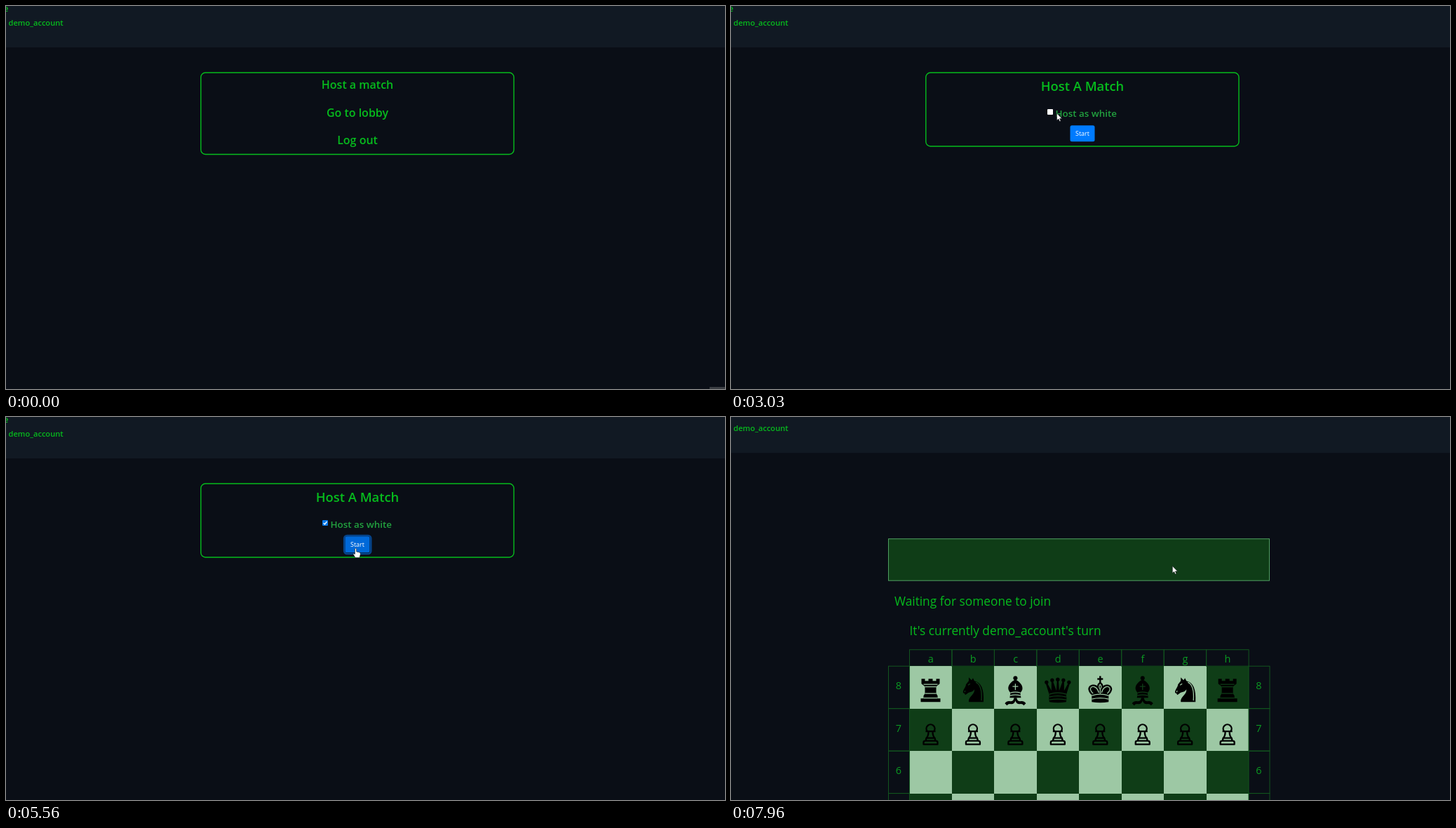
Recreate the animation shown at these times as an HTML page. Size 1025 by 546 pixels, loop 8000 ms.

```html
<!DOCTYPE html>
<html lang="en">
<head>
<meta charset="utf-8">
<title>Host a match</title>
<style>
html, body { margin: 0; width: 100%; height: 100%; overflow: hidden; background: #0a0e16; }
svg { display: block; font-family: "Open Sans", "Noto Sans", sans-serif; fill: #06bc1d; }
.bold { font-weight: 600; }
.mid { text-anchor: middle; }
.frame { fill: none; stroke: #06bc1d; stroke-width: 1.4; }
.grid { fill: none; stroke: #12551f; }
.label { fill: #0b9a22; font-size: 14.5px; text-anchor: middle; }
.piece { fill: #000; }
.cut { fill: none; stroke: var(--cell); stroke-width: 1.3; }
.line { fill: none; stroke: #000; stroke-width: 2.3; stroke-linejoin: round; }
</style>
</head>
<body>
<svg id="stage" width="1025" height="546" viewBox="0 0 1025 546"></svg>
<script>
const USER = "demo_account";
const LOOP = 8000, STEP = 68;
const LIGHT = "#9dc8a4", DARK = "#0f3d17";

// Pieces are drawn in a 60 px cell, centred on x = 30.
const fill = d => `<path d="${d}"/>`;
const cut = d => `<path class="cut" d="${d}"/>`;
const line = d => `<path class="line" d="${d}"/>`;
const dots = list => list.map(([x, y, r]) => `<circle cx="${x}" cy="${y}" r="${r}"/>`).join("");

const pieces = {
  rook: fill("M16 51V46H20V42L22 39V29L17 25V18H22V21H27V18H33V21H38V18H43V25L38 29V39L40 42V46H44V51Z")
    + cut("M20 26H40M22 29.500H38M22 39H38M20 45.500H40"),
  knight: fill("M24 51C23 43 33 41 32 33C29 38 25 36 22 39L19 41 18 39 16 38C15 34 20 30 20 26L24 21 24 16 28 20 30 17 32 21C42 23 46 33 45 51Z")
    + cut("M23 27L26 25M18 37L19 35M34 23C41 26 43 36 42 49"),
  bishop: dots([[30, 17, 3]])
    + fill("M30 19C36 22 41 27 40 33Q39 36 37 38L38 45H22L23 38Q21 36 20 33C19 27 24 22 30 19Z")
    + fill("M28 45H32Q32 50 37 50Q42 49 45 53L42 56Q40 53 36 54Q31 54 30 49Q29 54 24 54Q20 53 18 56L15 53Q18 49 23 50Q28 50 28 45Z")
    + cut("M30 25V34M26 29H34M23 38Q30 36 37 38M22.500 42Q30 40 37.500 42"),
  queen: dots([[14, 23, 2.6], [22, 20, 2.6], [30, 19, 2.7], [38, 20, 2.6], [46, 23, 2.6]])
    + fill("M18 51Q17 45 18 41L13 25 15 24 21 35 21 21H23L28 35 29 20H31L32 35 37 21H39L39 35 45 24 47 25 42 41Q43 45 42 51Q30 53 18 51Z")
    + cut("M18 40Q30 36 42 40M18 44Q30 41 42 44M18 48Q30 46 42 48"),
  king: fill("M28.800 14H31.200V17H34V19.500H31.200V23Q34 25 34 28C40 24 47 27 47 33Q46 38 42 41V51Q30 53 18 51V41Q14 38 13 33C13 27 20 24 26 28Q26 25 28.800 23V19.500H26V17H28.800Z")
    + cut("M30 39V33Q27 29 30 26Q33 29 30 33M28 38C26 29 17 26 16 33Q17 37 20 39M32 38C34 29 43 26 44 33Q43 37 40 39M18 42Q30 38 42 42M18 47Q30 44 42 47"),
  pawn: line("M25 32A6 6 0 1 1 35 32M23 32.500H37M27 33Q27 39 24 42M33 33Q33 39 36 42M24 42H36L37 46H23ZM20 51V48Q20 46 23 46H37Q40 46 40 48V51Z")
};

const text = (x, y, size, str, cls = "") =>
  `<text x="${x}" y="${y}" font-size="${size}" class="${cls}">${str}</text>`;
const rect = (x, y, w, h, attrs) =>
  `<rect x="${x}" y="${y}" width="${w}" height="${h}" ${attrs}/>`;
const frame = h => rect(277.8, 95, 446.2, h, 'rx="6.5" class="frame"');

function board() {
  const size = 60.45, left = 254.5, top = 363;
  const back = ["rook", "knight", "bishop", "queen", "king", "bishop", "knight", "rook"];
  let out = "";
  for (let col = 0; col < 8; col++) {
    const x = left + col * size;
    out += rect(x, 339.5, size, 23.5, 'class="grid"') + text(x + size / 2, 357.5, 15, "abcdefgh"[col], "label");
    for (let row = 0; row < 4; row++) {
      const y = top + row * size, color = (row + col) % 2 ? DARK : LIGHT;
      const name = row ? row == 1 && "pawn" : back[col];
      out += rect(x, y, size, size, `fill="${color}" shape-rendering="crispEdges"`);
      if (name) out += `<g class="piece" style="--cell:${color}" transform="translate(${x} ${y})">${pieces[name]}</g>`;
    }
  }
  for (let row = 0; row < 4; row++)
    for (const x of [224.5, 738]) {
      const y = top + row * size;
      out += rect(x, y, 30, size, 'class="grid"') + text(x + 14.5, y + 33, 15, 8 - row, "label");
    }
  return out;
}

stage.innerHTML = `
<rect width="1025" height="546" fill="#0a0e16"/>
<g id="page">
  <rect y="-10" width="1025" height="69" fill="#111923"/>
  ${text(-4, 8, 13, "e", "bold")}
  ${text(3.5, 28, 11.1, USER, "bold")}
  <g id="menu">
    ${frame(116.5)}
    <g id="link">${text(501, 118, 16, "Host a match", "bold mid")}</g>
    ${text(501, 157.5, 16, "Go to lobby", "bold mid")}
    ${text(501, 197, 16, "Log out", "bold mid")}
  </g>
  <g id="form">
    ${frame(105)}
    ${text(501, 121, 18.4, "Host A Match", "bold mid")}
    ${rect(451, 147, 8, 8, 'id="box" rx="1"')}
    <path id="tick" d="M452.700 151.200L454.400 153 457.500 149" fill="none" stroke="#fff" stroke-width="1.3"/>
    <g fill="#22a23f">${text(462.5, 158, 13.4, "Host as white", "bold")}</g>
    ${rect(482.2, 169, 38, 26, 'id="ring" rx="4" fill="none" stroke="#007bff" stroke-width="2.6"')}
    ${rect(483.5, 170.3, 35, 23, 'id="button" rx="2.5"')}
    <g fill="#fff">${text(501, 185.3, 9, "Start", "mid")}</g>
  </g>
  <g id="game">
    ${rect(224.5, 181.5, 543, 59.5, `fill="${DARK}" stroke="#4f9c61"`)}
    ${text(233, 276.5, 17.3, "Waiting for someone to join")}
    ${text(254.5, 318.5, 17.3, `It's currently ${USER}'s turn`)}
    ${board()}
  </g>
</g>
<rect id="status" x="1003" y="543" width="22" height="3" fill="#3a3d42"/>
<g id="cursor" fill="#fff" stroke="#15181d" stroke-width=".6">
  <circle id="click" r="7.3" fill="#e6dc48" fill-opacity=".62" stroke="none"/>
  <path id="arrow" d="M0 0V10L2.400 8 4 11.600 5.600 10.900 4.100 7.400H7.300Z"/>
  <path id="hand" d="M-1.100 1Q0-.6 1.100 1V5L5.500 6Q7 6.500 6.800 8.500L5.500 13.500H-.5L-3.500 8.500Q-3.500 7-1.100 8.500Z"/>
</g>`;

const el = id => document.getElementById(id);
const show = (id, on) => el(id).style.display = on ? "" : "none";
const within = (t, ...spans) => spans.some(([a, b]) => t >= a && t < b);

// start time, number of steps, end point
const moves = [
  [330, 8, 510.5, 102.5],
  [1680, 3, 498.5, 129],
  [2280, 7, 464.5, 153],
  [3830, 8, 498.5, 187],
  [5960, 3, 629.3, 212.5]
];

function pointer(t) {
  let x = 1108, y = 636;
  for (const [start, steps, toX, toY] of moves) {
    if (t < start) break;
    const k = Math.min(1, (Math.floor((t - start) / STEP) + 1) / steps);
    const ease = k * (2 - k);
    x += (toX - x) * ease;
    y += (toY - y) * ease;
  }
  return `translate(${x} ${y})`;
}

function draw(t) {
  const checked = !within(t, [2950, 3700]);
  const hand = within(t, [740, 1680], [4160, 5960]);
  show("status", t < 70);
  show("menu", t < 1680);
  show("form", within(t, [1680, 6560]));
  show("game", t >= 6630);
  show("tick", checked);
  show("hand", hand);
  show("arrow", !hand);
  show("click", within(t, [1210, 1360], [2820, 3030], [3560, 3700], [5150, 5300]));
  el("link").setAttribute("text-decoration", t >= 740 ? "underline" : "none");
  el("box").setAttribute("fill", checked ? "#0877e8" : "#fff");
  el("button").setAttribute("fill", t >= 4160 ? "#0069d9" : "#007bff");
  el("ring").setAttribute("opacity", Math.max(0, Math.min(1, (t - 5160) / 200)) * .5);
  el("page").setAttribute("transform", `translate(0 ${t >= 7960 ? -7.8 : 0})`);
  el("cursor").setAttribute("transform", pointer(t));
}

const begin = performance.now();
function tick(now) {
  draw(Math.max(0, now - begin) % LOOP);
  requestAnimationFrame(tick);
}
draw(0);
requestAnimationFrame(tick);
</script>
</body>
</html>
```
